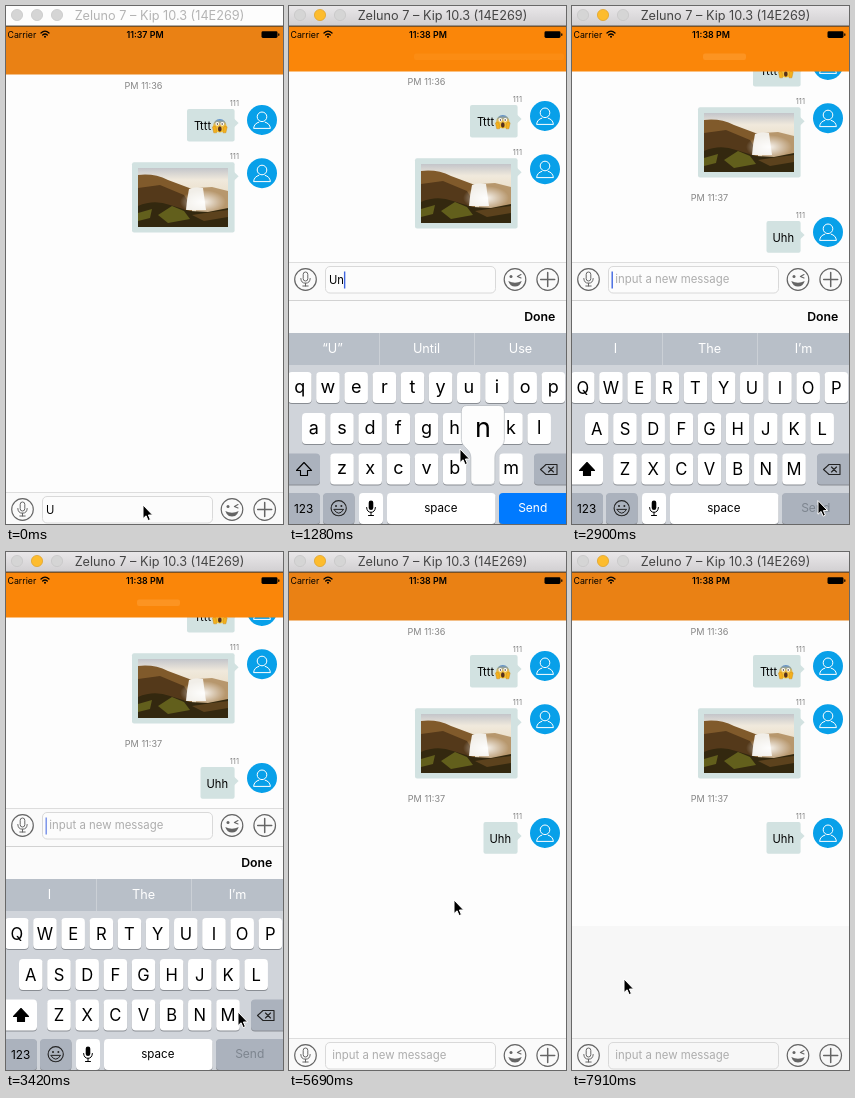
These frames come from a looping animation (277x518 px, 8 s). An HTML page:

```html
<!DOCTYPE html>
<html lang="en">
<head>
<meta charset="utf-8">
<title>Chat keyboard demo</title>
<style>
html, body { margin: 0; width: 100%; height: 100%; overflow: hidden; background: #fdfdfd; }
svg { display: block; width: 277px; height: 518px; font-family: Inter, Roboto, sans-serif; }
.mid { text-anchor: middle; }
.line { fill: none; stroke-linecap: round; stroke-linejoin: round; }
</style>
</head>
<body>
<svg id="stage" viewBox="0 0 277 518"></svg>
<script>
const LOOP = 8000;
const stage = document.getElementById('stage');
const $ = id => document.getElementById(id);

const rect = (x, y, w, h, fill, r = 0, extra = '') =>
  `<rect x="${x}" y="${y}" width="${w}" height="${h}" rx="${r}" fill="${fill}" ${extra}/>`;
const text = (x, y, size, str, fill = '#000', extra = '') =>
  `<text x="${x}" y="${y}" font-size="${size}" fill="${fill}" ${extra}>${str}</text>`;
const mid = (x, y, size, str, fill, extra = '') => text(x, y, size, str, fill, 'class="mid" ' + extra);
const circle = (x, y, r, fill, extra = '') => `<circle cx="${x}" cy="${y}" r="${r}" fill="${fill}" ${extra}/>`;
const line = (d, color, w = 1, extra = '') =>
  `<path class="line" d="${d}" stroke="${color}" stroke-width="${w}" ${extra}/>`;
const group = (id, body, extra = '') => `<g id="${id}" ${extra}>${body}</g>`;

// Messages
const avatar = y => `<g transform="translate(256 ${y})">` + circle(0, 0, 15, '#08a0e9') +
  circle(0, -3.2, 4.8, 'none', 'stroke="#fff" stroke-width="1"') +
  line('M-3.2 2.2C-6 3 -8 4.8 -8.4 8.4H8.4C8 4.8 6 3 3.2 2.2', '#fff') + '</g>';

const bubble = (x, y, h) => rect(x, y, 228.6 - x, h, '#d2e2e1', 2) +
  `<path d="M228 ${y + 9.5}L232.6 ${y + 14}L228 ${y + 18.5}Z" fill="#d2e2e1"/>` +
  text(233, y - 3.5, 7.6, '111', '#858585', 'text-anchor="end"') + avatar(y + 11);

const scared = `<g transform="translate(213.8 119.8) scale(1.08)">
  ${circle(0, 0, 6.2, 'url(#face)')}
  ${circle(-2.3, -1.8, 1.7, '#fff')}${circle(2.3, -1.8, 1.7, '#fff')}
  ${circle(-2.2, -1.7, .7, '#402d20')}${circle(2.2, -1.7, .7, '#402d20')}
  <ellipse cy="3" rx="1.7" ry="2.6" fill="#56301d"/>
  <path d="M-6.8 1Q-4 -.8 -3.3 2L-3 6.5H-5.6ZM6.8 1Q4 -.8 3.3 2L3 6.5H5.6Z" fill="#f3b01c" stroke="#c98412" stroke-width=".4"/></g>`;

const photo = `<svg x="132" y="162" width="90" height="59" viewBox="0 0 90 59">
  ${rect(0, 0, 90, 59, 'url(#sky)')}
  <path d="M0 7Q16 5 30 12L54 21V59H0Z" fill="#805a2b"/>
  <path d="M0 20L22 17L46 27L54 40L0 50Z" fill="#54391a"/>
  <path d="M58 20L74 19L90 23V48H58Z" fill="#b7976d"/>
  <path d="M51 21Q58 18 65 20L68 42H48Q49 30 51 21Z" fill="#f1eee8"/>
  <ellipse cx="65" cy="34" rx="23" ry="12" fill="url(#mist)"/>
  <path d="M0 38Q16 31 32 37L52 43L70 44L90 40V59H0Z" fill="#33280f"/>
  <path d="M20 47L34 38L46 43L52 51L30 55ZM0 45L14 41L12 50L0 53Z" fill="#625f1c"/>
  <path d="M54 47L74 44L90 42V49L66 53Z" fill="#5c421d"/></svg>`;

const list = mid(137.5, 83.3, 9.1, 'PM 11:36', '#868686') +
  bubble(181, 103, 32.6) + text(188, 124, 11.2, 'Tttt') + scared +
  bubble(126, 156.2, 70.4) + photo +
  group('sent', mid(137.5, 250.3, 9.1, 'PM 11:37', '#868686') +
    bubble(194.5, 270, 31.8) + text(200.5, 290.8, 11.2, 'Uhh'));

// Input bar
const G = '#656565';
const bar = rect(0, 486, 277, 38, '#fafafa', 0, 'id="barBg"') + rect(0, 486, 277, .8, '#d6d6d6') +
  circle(16.5, 503.5, 10.8, 'none', `stroke="${G}" stroke-width="1.2"`) +
  rect(14.2, 496, 4.6, 9, 'none', 2.3, `stroke="${G}"`) +
  line('M11.8 502.5Q12 507.2 16.5 507.2Q21 507.2 21.2 502.5M16.5 507.2V510M13.8 510H19.2', G) +
  rect(36.5, 490.5, 170, 26.5, '#fcfcfc', 4.5, 'id="field" stroke="#d9d9d9"') +
  circle(226, 503.5, 10.8, 'none', `stroke="${G}" stroke-width="1.2"`) +
  circle(222, 500.5, 1.5, G) +
  line('M232 498.6L228.4 500.4L232 502', G, 1.1) +
  `<path d="M219.3 505Q226 508.4 232.7 505Q231 510.6 226 510.6Q221 510.6 219.3 505Z" fill="${G}"/>` +
  circle(258.7, 503.5, 10.8, 'none', `stroke="${G}" stroke-width="1.2"`) +
  line('M251.7 503.5H265.7M258.7 496.5V510.5', G, 1.5) +
  rect(38, 495, 31, 18.5, '#b7cde3', 0, 'id="mark"') +
  text(43.3, 507, 11.4, 'input a new message', '#adadad', 'id="hint"') +
  text(40, 507.5, 11.2, '', '#000', 'id="typed"') +
  rect(40, 495.5, 1.4, 17, '#3f65e0', 0, 'id="caret"');

// Keyboard
const cap = (x, y, w, fill, id = '') =>
  rect(x, y + 1, w, 31, '#898d93', 4) + rect(x, y, w, 31, fill, 4, id && `id="${id}"`);
const rows = [['qwertyuiop', 10.8, 366], ['asdfghjkl', 24.8, 407], ['zxcvbnm', 53, 447.5]];
const keyPos = {};
const letters = rows.map(([chars, x0, y]) => [...chars].map((c, i) => {
  const x = x0 + i * 28.17;
  keyPos[c] = [x, y];
  return cap(x - 11.8, y, 23.6, '#fff') + mid(x, y + 21, 18, c, '#000', `data-key="${c}"`);
}).join('')).join('');

const DARK = '#abb2bd';
const keyboard = rect(0, 294, 277, 33, '#fbfbfb') + rect(0, 294, 277, .8, '#c9c9c9') +
  text(266.3, 315.2, 12.3, 'Done', '#000', 'font-weight="600" text-anchor="end"') +
  rect(0, 327, 277, 191, '#d0d4da') + rect(0, 327, 277, 32, '#b8bfc8') +
  rect(90.5, 327, 94.5, 32, '#dfe3e7', 0, 'id="pick"') +
  rect(90, 327, .8, 32, '#d0d5da') + rect(185, 327, .8, 32, '#d0d5da') +
  [43.5, 137.5, 231.5].map((x, i) => mid(x, 346.8, 12.7, '', '#fff', `id="word${i}"`)).join('') +
  letters +
  cap(-5, 447.5, 36, DARK, 'shift') +
  `<path id="arrow" d="M15 456.5L22.5 464.5H18.5V469.5H11.5V464.5H7.5Z" stroke="#000" stroke-width="1.1" stroke-linejoin="round"/>` +
  cap(245, 447.5, 36, DARK) +
  line('M257 458.5H268V468.5H257L251.5 463.5ZM259.5 461L264.5 466M264.5 461L259.5 466', '#222', 1.1) +
  cap(-5, 487, 36, DARK) + mid(14.7, 506.6, 11.8, '123') +
  cap(34, 487, 31.5, DARK) + circle(49.7, 502.2, 7.6, 'none', 'stroke="#222" stroke-width="1.1"') +
  circle(47, 500, 1, '#222') + circle(52.4, 500, 1, '#222') +
  line('M45 503.7Q49.7 511 54.4 503.7Z', '#222') +
  cap(70, 487, 24, '#fff') + rect(79.7, 494.5, 4.6, 9.5, '#000', 2.3) +
  line('M77.6 501.5Q78 506.3 82 506.3Q86 506.3 86.4 501.5M82 506.3V509.5M79.5 509.5H84.5', '#000') +
  cap(98, 487, 108.5, '#fff') + mid(151.8, 506, 11.6, 'space') +
  cap(210, 487, 71, '#007aff', 'send') + mid(243.7, 506.4, 12, 'Send', '#fff', 'id="sendText"') +
  group('pop', `<path d="M-16 0H16Q21.5 0 21.5 6V34C21.5 42 12 43 12 52V75Q12 79 8 79H-8Q-12 79 -12 75V52C-12 43 -21.5 42 -21.5 34V6Q-21.5 0 -16 0Z" fill="#fdfdfd" stroke="#b4b8be" stroke-width=".7"/>` +
    mid(0, 31, 27, '', '#000', 'id="popText"'));

const header = rect(0, 20, 277, 48.5, '#ea8114', 0, 'id="nav"') +
  rect(131, 47.5, 43, 6.5, '#ffb45e', 2, 'id="sheen"') +
  text(1.5, 31.6, 8.8, 'Carrier') +
  line('M35 27Q39 23.2 43 27M36.7 29Q39 26.9 41.3 29', '#000', 1.3) + circle(39, 30.8, 1, '#000') +
  mid(139, 31.6, 8.9, '', '#000', 'id="clock" font-weight="600"') +
  rect(255.5, 25.3, 16, 6.6, '#000', 1.4) + rect(272.2, 27.3, 1.2, 2.6, '#000', .6) +
  rect(0, 0, 277, 20, '#fdfdfd', 0, 'id="title"') + rect(0, 19.6, 277, 1, '#33302c') +
  [11, 31, 51].map((x, i) => circle(x, 9, 5.6, '#d5d5d5', `id="light${i}" stroke="#c4c4c4" stroke-width=".7"`)).join('') +
  mid(153.5, 13.8, 12.7, 'Zeluno 7 – Kip 10.3 (14E269)', '#b4b4b4', 'id="name"');

const gradient = (id, stops) => `<linearGradient id="${id}" x2="0" y2="1">` +
  stops.map(([o, c]) => `<stop offset="${o}" stop-color="${c}"/>`).join('') + '</linearGradient>';

stage.innerHTML = '<defs>' +
  gradient('chrome', [[0, '#e9e7e9'], [1, '#d1cfd1']]) +
  gradient('face', [[0, '#5a8fd0'], [.45, '#e9bd4c'], [1, '#fbc72d']]) +
  gradient('sky', [[0, '#c3c5ca'], [.2, '#f0e9dc'], [1, '#e0c9a2']]) +
  '<radialGradient id="mist"><stop stop-color="#fff" stop-opacity=".9"/><stop offset="1" stop-color="#fff" stop-opacity="0"/></radialGradient></defs>' +
  rect(0, 0, 277, 518, '#fdfdfd') + group('list', list) +
  rect(0, 374, 277, 144, '#f7f7f7', 0, 'id="panel"') +
  group('bar', bar) + group('keyboard', keyboard) + header +
  group('pointer', '<path d="M0 0V13.6L3.1 10.8L5.1 15.6L7.4 14.6L5.4 10H9.6Z" fill="#000" stroke="#fff" stroke-width="1"/>');

// Timeline
const clamp = v => Math.max(0, Math.min(1, v));
const ease = v => v * v * (3 - 2 * v);
const ramp = (t, a, b) => ease(clamp((t - a) / (b - a)));
const mix = (a, b, k) => a + (b - a) * k;
const last = (t, steps) => steps.filter(s => s[0] <= t).pop();

const path = [
  [0, 137, 499], [760, 137, 499], [1140, 189, 455], [1210, 189, 455], [1280, 171, 443],
  [1480, 163, 418], [1960, 163, 418], [2170, 207, 384], [2300, 258, 474], [2480, 246, 496],
  [3140, 246, 494], [3420, 232, 460], [3910, 229, 272], [4200, 229, 272], [4420, 243, 249],
  [4620, 237, 268], [4680, 238, 270], [4820, 238, 270], [4910, 240, 272], [5150, 240, 272],
  [5420, 165, 348], [5990, 165, 348], [6300, 247, 499], [6950, 247, 499], [7700, 52, 427], [LOOP, 52, 427]
];
const typing = [[0, 'U'], [1230, 'Un'], [1640, 'Unh'], [1880, 'Unhh'], [2560, '']];
const words = [
  [0, '“U”', 'Until', 'Use'], [1460, '“Un”', 'Until', 'Use'], [1680, '“Unh”', 'Uhh', 'Unbelievable'],
  [1920, '“Unhh”', 'Uhh', 'Unbelievable'], [2580, 'I', 'The', 'I’m']
];
const presses = [[1180, 1340, 'n'], [1560, 1680, 'h'], [1800, 1920, 'h']];

const set = (id, attrs) => {
  const el = $(id);
  for (const k in attrs) el.setAttribute(k, attrs[k]);
};
const label = (id, str) => { if ($(id).textContent !== str) $(id).textContent = str; };
const show = (id, on) => set(id, { opacity: +on });
const shiftY = (id, y) => set(id, { transform: `translate(0 ${y})` });

let caps = null;
function setCaps(on) {
  if (caps === on) return;
  caps = on;
  stage.querySelectorAll('[data-key]').forEach(el => {
    const c = el.dataset.key;
    el.textContent = on ? c.toUpperCase() : c;
    el.setAttribute('font-size', on ? 16.6 : 18);
    el.setAttribute('y', keyPos[c][1] + (on ? 21.8 : 20.5));
  });
  set('shift', { fill: on ? '#fff' : DARK });
  set('arrow', { fill: on ? '#000' : 'none' });
  set('send', { fill: on ? DARK : '#007aff' });
  set('sendText', { fill: on ? '#7d858f' : '#fff' });
}

function pointerAt(t) {
  const i = path.findIndex(p => p[0] > t);
  const [a, b] = [path[i - 1], path[i]];
  const k = ramp(t, a[0], b[0]);
  return [mix(a[1], b[1], k), mix(a[2], b[2], k)];
}

function draw(t) {
  const active = t >= 420;
  set('title', { fill: active ? 'url(#chrome)' : '#fdfdfd' });
  set('name', { fill: active ? '#454545' : '#b4b4b4' });
  set('light1', { fill: active ? '#fdbc2e' : '#d5d5d5', stroke: active ? '#dfa023' : '#c4c4c4' });
  label('clock', t < 760 ? '11:37 PM' : '11:38 PM');

  const open = ramp(t, 740, 1040) * (1 - ramp(t, 5440, 5680));
  const sent = t >= 2580;
  const scroll = mix(4, 55, ramp(t, 2600, 2900));
  shiftY('list', -scroll * open);
  show('sent', sent);
  set('nav', {
    height: mix(48.5, 45.5, open),
    fill: `rgb(${mix(234, 250, open)},${mix(129, 134, open)},${mix(20, 9, open)})`
  });
  set('sheen', { opacity: open * (sent ? .3 : .12), x: sent ? 131 : 125, width: sent ? 43 : 150 });

  const rise = ramp(t, 6350, 6600);
  const dropped = t >= 7910;
  shiftY('bar', -230 * open - (dropped ? 0 : 112 * rise));
  shiftY('panel', 144 * (1 - rise));
  show('panel', rise > 0);
  set('barBg', { fill: dropped ? '#f7f7f7' : '#fafafa' });
  set('field', { fill: dropped ? '#f7f7f7' : '#fcfcfc' });
  shiftY('keyboard', 230 * (1 - open));

  const str = last(t, typing)[1];
  label('typed', str);
  show('hint', !str);
  const end = 40 + (str ? $('typed').getComputedTextLength() : -.5);
  const marked = str === 'Unhh';
  show('mark', marked);
  set('mark', { width: end - 38 });
  const beat = (t + 140) % 1000;
  const blink = sent ? Math.max(1 - ramp(beat, 520, 640), ramp(beat, 970, 1000)) : 1;
  set('caret', { x: end, opacity: t > 740 && t < 5440 ? blink : 0 });

  last(t, words).slice(1).forEach((w, i) => label('word' + i, w));
  show('pick', marked);
  set('word1', { fill: marked ? '#1c7cf2' : '#fff' });
  setCaps(sent);

  const press = presses.find(p => t >= p[0] && t < p[1]);
  show('pop', !!press);
  if (press) {
    const [x, y] = keyPos[press[2]];
    set('pop', { transform: `translate(${x} ${y - 48})` });
    label('popText', press[2]);
  }

  set('pointer', { transform: `translate(${pointerAt(t).join(' ')})` });
}

const start = performance.now();
function tick() {
  draw((performance.now() - start) % LOOP);
  requestAnimationFrame(tick);
}
tick();
</script>
</body>
</html>
```
